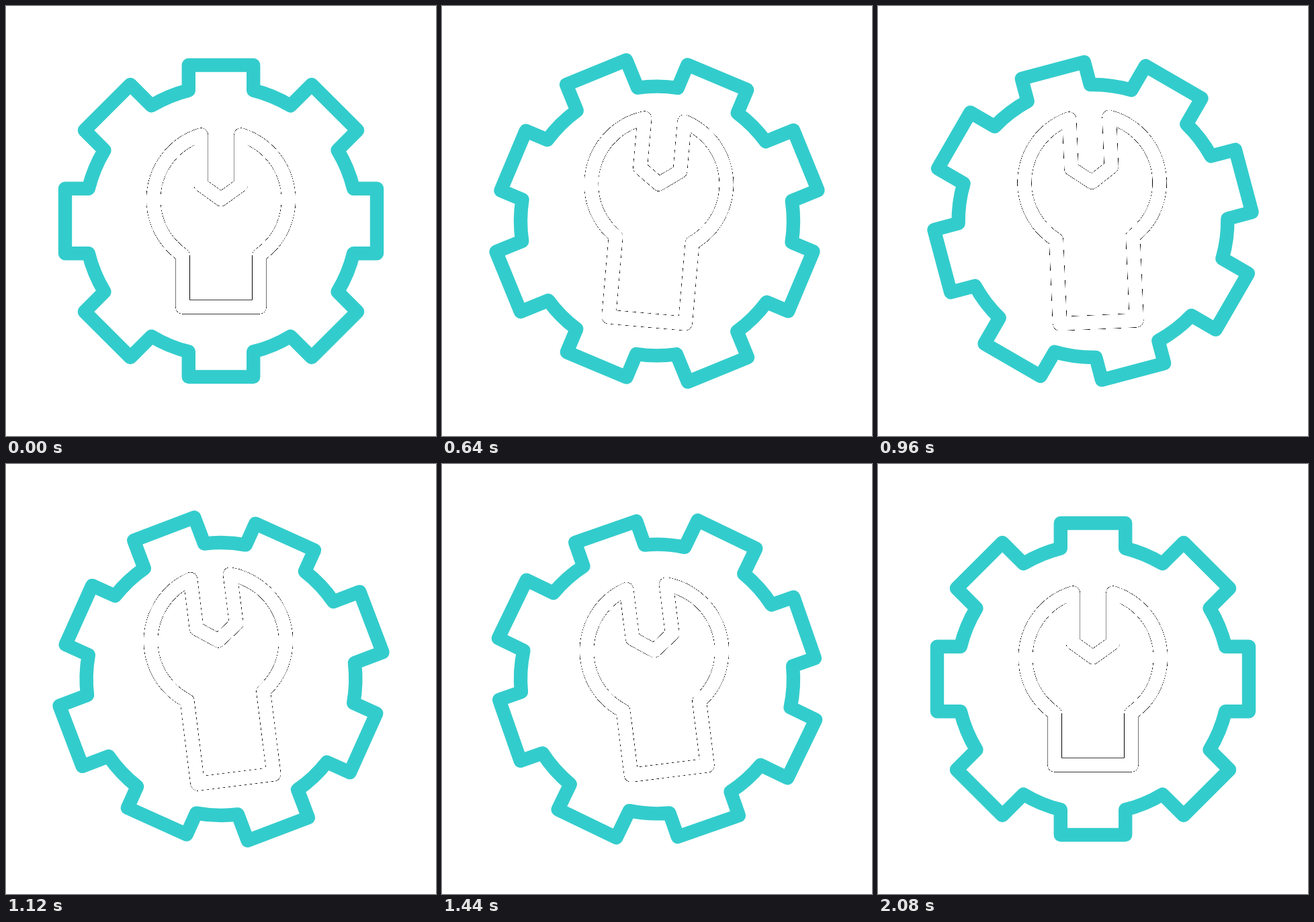
Animation of 640x640 px, one loop 2.12 s. Source, as an HTML page with a canvas:

```html
<!DOCTYPE html>
<html lang="en">
<head>
<meta charset="utf-8">
<title>Turning gear and wrench</title>
<style>
  html, body { margin: 0; width: 100%; height: 100%; overflow: hidden; background: #fff; }
  canvas { display: block; width: 640px; height: 640px; }
</style>
</head>
<body>
<canvas id="stage" width="640" height="640"></canvas>
<script>
const ctx = document.getElementById('stage').getContext('2d', { willReadFrequently: true });
const LOOP = 2120, STEP = 40, MID = 320, LINE = 20.4;

// Keys are [time, value]
const GEAR_TURN = [[0, 0], [2040, 180]];
const WRENCH_TILT = [[0, 0], [640, 5], [1240, -7.7], [2040, 0]];
const WRENCH_STRETCH = [[70, 0], [870, 48], [1010, 48], [1810, 0]];

// Same curve as cubic-bezier(.65, 0, .35, 1)
function ease(x) {
  let lo = 0, hi = 1;
  for (let i = 0; i < 30; i++) {
    const s = (lo + hi) / 2, r = 1 - s;
    if (1.95 * s * r * r + 1.05 * s * s * r + s * s * s < x) lo = s;
    else hi = s;
  }
  return lo * lo * (3 - 2 * lo);
}

function valueAt(keys, t) {
  if (t <= keys[0][0]) return keys[0][1];
  for (let i = 1; i < keys.length; i++) {
    const [t0, a] = keys[i - 1], [t1, b] = keys[i];
    if (t < t1) return a + (b - a) * ease((t - t0) / (t1 - t0));
  }
  return keys[keys.length - 1][1];
}

// Teeth alternate in height; valleys beside the horizontal axis are shallower
function makeGear() {
  const half = 48.2, tips = [232, 239], bases = [194.5, 197.2, 197.2, 194.5];
  const path = new Path2D();
  for (let i = 0; i < 8; i++) {
    const turn = i * Math.PI / 4, c = Math.cos(turn), s = Math.sin(turn);
    const tip = tips[i % 2], before = bases[(i + 3) % 4], after = bases[i % 4];
    const corners = [[-half, -before], [-half, -tip], [half, -tip], [half, -after]];
    for (const [x, y] of corners) path.lineTo(x * c - y * s, x * s + y * c);
    const from = turn - Math.PI / 2 + Math.atan2(half, after);
    const to = turn - Math.PI / 4 - Math.atan2(half, after);
    path.arc(0, 0, Math.hypot(half, after), from, to);
  }
  path.closePath();
  return path;
}

// Wrench around its own centre; the handle grows by `stretch`
function makeWrench(stretch) {
  const headY = -32, r = 100.6, jaw = 29.8, stem = 57.15, foot = 128 + stretch;
  const jawAngle = Math.acos(jaw / r), neckAngle = Math.acos(stem / r);
  const path = new Path2D();
  path.moveTo(-jaw, headY - r * Math.sin(jawAngle));
  path.lineTo(-jaw, -54);
  path.lineTo(0, -32.5);
  path.lineTo(jaw, -54);
  path.arc(0, headY, r, -jawAngle, neckAngle);
  path.lineTo(stem, foot);
  path.lineTo(-stem, foot);
  path.arc(0, headY, r, Math.PI - neckAngle, Math.PI + jawAngle);
  path.closePath();
  return path;
}

function strokeAt(path, y, degrees, colour) {
  ctx.save();
  ctx.translate(MID, y);
  ctx.rotate(degrees * Math.PI / 180);
  ctx.lineWidth = LINE;
  ctx.lineJoin = 'round';
  ctx.strokeStyle = colour;
  ctx.stroke(path);
  ctx.restore();
}

// Keeps only a dark hairline where the stroke partly covers a pixel
function keepFringe(x, y, w, h) {
  const img = ctx.getImageData(x, y, w, h), px = img.data;
  for (let i = 0; i < px.length; i += 4) {
    const cover = px[i + 3] / 255;
    const dark = cover > 0.02 ? Math.max(0, Math.min(1, (0.6 - cover) / 0.45)) : 0;
    px[i] = px[i + 1] = px[i + 2] = 0;
    px[i + 3] = dark * 255;
  }
  ctx.putImageData(img, x, y);
}

const gear = makeGear();

function draw(t) {
  const stretch = valueAt(WRENCH_STRETCH, t);
  ctx.clearRect(0, 0, 640, 640);
  strokeAt(makeWrench(stretch), MID - stretch * 0.53, valueAt(WRENCH_TILT, t), '#fff');
  keepFringe(180, 130, 280, 380);
  strokeAt(gear, MID, valueAt(GEAR_TURN, t), '#33cccc');
}

const start = performance.now();
let shown = -1;

function tick() {
  const t = Math.floor((performance.now() - start) % LOOP / STEP) * STEP;
  if (t !== shown) draw(shown = t);
  requestAnimationFrame(tick);
}
tick();
</script>
</body>
</html>
```
